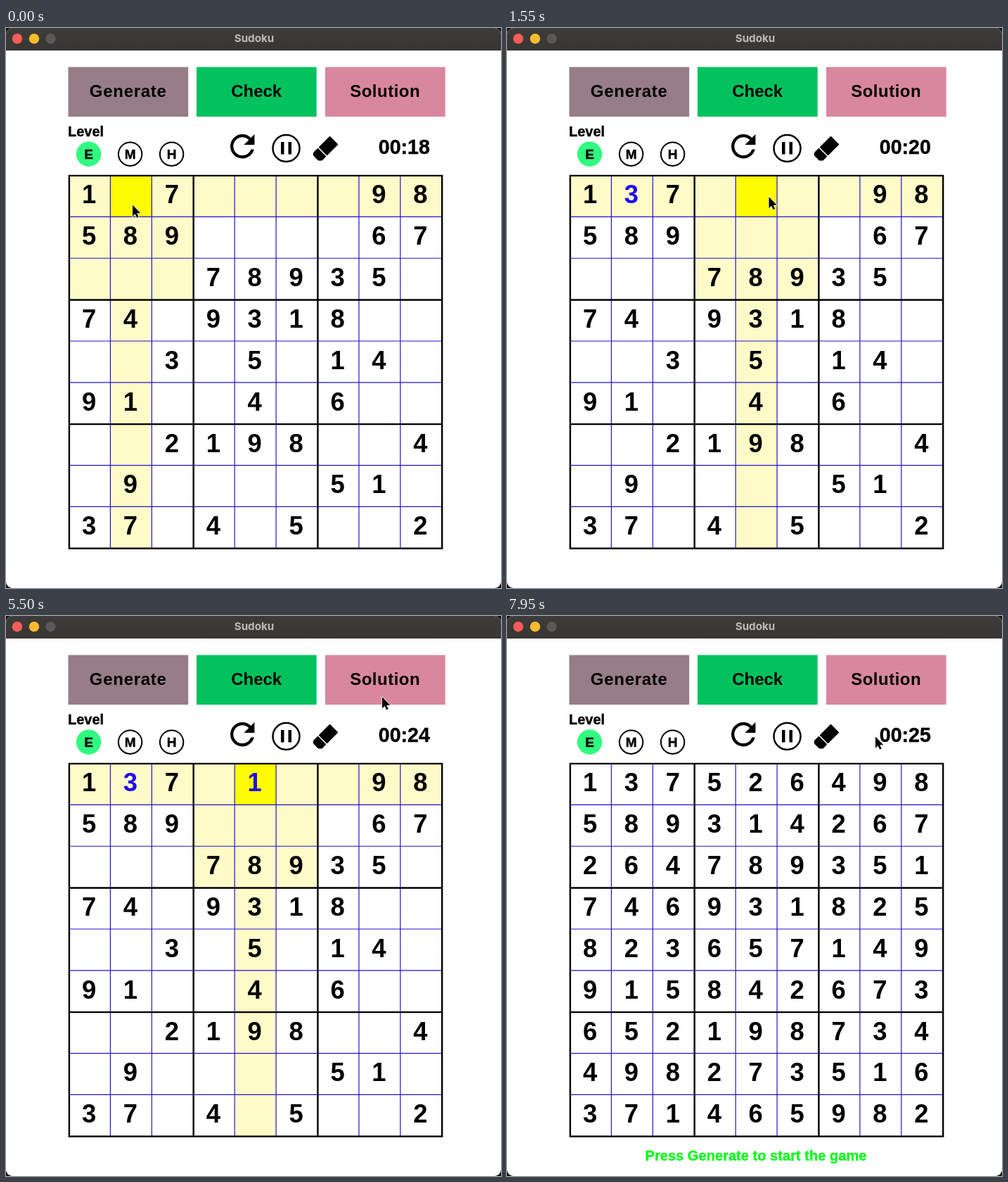
These frames come from a looping animation (704x796 px, 8000 ms). An HTML page:

```html
<!DOCTYPE html>
<html lang="en">
<head>
<meta charset="utf-8">
<title>Sudoku</title>
<style>
  html, body { margin: 0; width: 100%; height: 100%; overflow: hidden; background: #11110c; }
  svg { display: block; width: 100%; height: 100%; }
  text { font-family: "Liberation Sans", Arial, Helvetica, sans-serif; font-weight: 700; }
  .mid { text-anchor: middle; }
  .title { font-family: Inter, sans-serif; }
  .heavy { stroke-width: 0.4; }
</style>
</head>
<body>
<svg id="stage" viewBox="0 0 704 796">
  <defs>
    <clipPath id="win"><rect width="704" height="796" rx="9"/></clipPath>
    <linearGradient id="bar" x2="0" y2="1">
      <stop stop-color="#3e3c3a"/><stop offset="1" stop-color="#383634"/>
    </linearGradient>
  </defs>
  <g clip-path="url(#win)">
    <rect width="704" height="796" fill="#fff"/>
    <rect width="704" height="32" fill="url(#bar)"/>
    <g id="chrome"></g>
    <g id="shade"></g>
    <g id="grid"></g>
    <g id="digits"></g>
    <g id="icons">
      <path transform="translate(310.4 142.4) scale(2.15)" d="M17.65 6.35C16.2 4.9 14.21 4 12 4c-4.42 0-7.99 3.58-7.99 8s3.57 8 7.99 8c3.73 0 6.84-2.55 7.73-6h-2.08c-.82 2.33-3.04 4-5.65 4-3.31 0-6-2.69-6-6s2.69-6 6-6c1.66 0 3.14.69 4.22 1.78L13 11h7V4z"/>
      <circle cx="398.5" cy="171" r="19" fill="none" stroke="#000" stroke-width="2.5"/>
      <path d="M391 162h4.500v17.5h-4.500zM401.500 162h4.500v17.5h-4.500z"/>
      <g stroke="#000" stroke-width="2" stroke-linejoin="round">
        <path d="M460.5 155 471 165.500 456.500 180 446 169.500z"/>
        <path d="M443.500 172 454 182.500 449 187.500H444.500L438.500 181.500Q437 179.500 438.500 177z"/>
      </g>
    </g>
    <g id="dynamic"></g>
    <path id="pointer" d="M0 0V16.2L3.6 12.700 6.100 18.300 8.700 17.100 6.200 11.700H11.300z" fill="#000" stroke="#fff" stroke-width="1.4" stroke-linejoin="round" paint-order="stroke"/>
  </g>
</svg>
<script>
const LOOP = 8000, TICK = 50;
const X0 = 89.9, Y0 = 209.9, W = 58.92, H = 58.87;
const $ = id => document.getElementById(id);

const puzzle = ["1.7....98", "589....67", "...78935.", "74.9318..", "..3.5.14.",
  "91..4.6..", "..2198..4", ".9....51.", "37.4.5..2"];
const solved = ["137526498", "589314267", "264789351", "746931825", "823657149",
  "915842673", "652198734", "498273516", "371465982"];

// When things happen, in ms
const at = { three: 50, select: 1550, one: 3300, ask: 5550, solve: 7050, firstTick: 250 };
// Pointer tip: time, x, y
const path = [[700, 180, 251.5], [850, 202, 252], [1100, 318, 244], [1300, 368, 240.5],
  [1400, 372.5, 240], [4300, 372.5, 240], [4500, 387, 232], [4750, 410.5, 216.5],
  [4950, 468, 168], [5100, 520, 124], [5350, 535, 115], [6050, 535, 115],
  [6250, 530, 144], [6450, 524, 167.5], [7900, 524, 167.5], [7950, 524, 171.5]];

function add(parent, tag, attrs, text) {
  const el = document.createElementNS("http://www.w3.org/2000/svg", tag);
  for (const k in attrs) el.setAttribute(k, attrs[k]);
  if (text !== undefined) el.textContent = text;
  parent.append(el);
  return el;
}
const label = (parent, x, y, size, text, attrs) =>
  add(parent, "text", { x, y, "font-size": size, ...attrs }, text);

function buildChrome() {
  const g = $("chrome");
  [[16, "#fc5d57"], [40, "#fdbc2f"], [63.5, "#5b5957"]].forEach(([cx, fill]) =>
    add(g, "circle", { cx, cy: 15.2, r: 7.2, fill }));
  label(g, 353, 20.3, 15.2, "Sudoku", { class: "mid title", fill: "#bdbbb9" });

  [["Generate", 88.5, "#967d87", 0.7], ["Check", 271, "#03c25e", 0], ["Solution", 454, "#d8879f", 0.5]]
    .forEach(([name, x, fill, gap]) => {
      add(g, "rect", { x, y: 55.5, width: 170.7, height: 70.5, fill });
      label(g, x + 85.2, 98, 24, name, { class: "mid", "letter-spacing": gap });
    });

  label(g, 88, 154, 20, "Level", { class: "heavy", stroke: "#000" });
  ["E", "M", "H"].forEach((name, i) => {
    const cx = 117.6 + i * 59;
    add(g, "circle", i
      ? { cx, cy: 179.2, r: 16.7, fill: "#fff", stroke: "#000", "stroke-width": 2 }
      : { cx, cy: 179.2, r: 17.7, fill: "#30fb80" });
    label(g, cx, 186, 19, name, { class: "mid heavy", stroke: "#000" });
  });
}

function buildGrid() {
  const right = X0 + 9 * W, bottom = Y0 + 9 * H;
  const lines = (thick, style) => {
    let d = "";
    for (let i = 0; i < 10; i++) {
      if ((i % 3 === 0) !== thick) continue;
      d += `M${X0 + i * W} ${Y0}V${bottom}M${X0} ${Y0 + i * H}H${right}`;
    }
    add($("grid"), "path", { d, fill: "none", ...style });
  };
  lines(false, { stroke: "#2412cc", "stroke-width": 1.2, transform: "translate(-0.4 -0.4)" });
  lines(true, { stroke: "#000", "stroke-width": 2.4, "stroke-linecap": "square" });
}

const cells = [];
function buildCells() {
  for (let r = 0; r < 9; r++) for (let c = 0; c < 9; c++) {
    const bg = add($("shade"), "rect", { x: X0 + c * W, y: Y0 + r * H, width: W + 0.1, height: H + 0.1 });
    const num = label($("digits"), 118 + c * W, 249.3 + r * H, 36.4, "", { class: "mid" });
    cells.push({ r, c, bg, num });
  }
}

buildChrome();
buildGrid();
buildCells();
const clock = label($("dynamic"), 529.8, 179.2, 28.6, "", { class: "heavy", stroke: "#000" });
const note = label($("dynamic"), 354, 774, 20.1, "", { class: "mid heavy" });

function shadeOf(r, c, sel) {
  if (sel < 0) return "none";
  if (r === 0 && c === sel) return "#fffb00";
  const sameBox = r < 3 && Math.floor(c / 3) === Math.floor(sel / 3);
  return r === 0 || c === sel || sameBox ? "#fefbc8" : "none";
}

function pointerAt(t) {
  const i = path.findIndex(p => p[0] >= t);
  if (i === 0) return path[0].slice(1);
  if (i < 0) return path[path.length - 1].slice(1);
  const [a, b] = [path[i - 1], path[i]];
  const k = (t - a[0]) / (b[0] - a[0]);
  return [a[1] + (b[1] - a[1]) * k, a[2] + (b[2] - a[2]) * k];
}

function render(t) {
  const done = t >= at.solve;
  const sel = t >= at.ask ? -1 : t >= at.select ? 4 : 1;
  for (const { r, c, bg, num } of cells) {
    let s = done ? solved[r][c] : puzzle[r][c], fill = "#000";
    if (!done && r === 0) {
      const typed = c === 1 && t >= at.three ? "3" : c === 4 && t >= at.one ? "1" : "";
      if (typed) { s = typed; fill = "#1f0af0"; }
    }
    num.textContent = s === "." ? "" : s;
    num.setAttribute("fill", fill);
    bg.setAttribute("fill", shadeOf(r, c, sel));
  }
  const sec = Math.min(25, 19 + Math.floor((t - at.firstTick) / 1000));
  clock.textContent = "00:" + sec;
  note.textContent = done ? "Press Generate to start the game"
    : t >= at.ask ? "You want to quit and see solution? Space / Esc" : "";
  const ink = done ? "#04fb18" : "#e6020b";
  note.setAttribute("fill", ink);
  note.setAttribute("stroke", ink);
  $("pointer").setAttribute("transform", `translate(${pointerAt(t)})`);
}

const start = performance.now();
let last = -1;
function frame() {
  const t = Math.floor(Math.max(0, performance.now() - start) % LOOP / TICK) * TICK;
  if (t !== last) render(last = t);
  requestAnimationFrame(frame);
}
frame();
</script>
</body>
</html>
```
